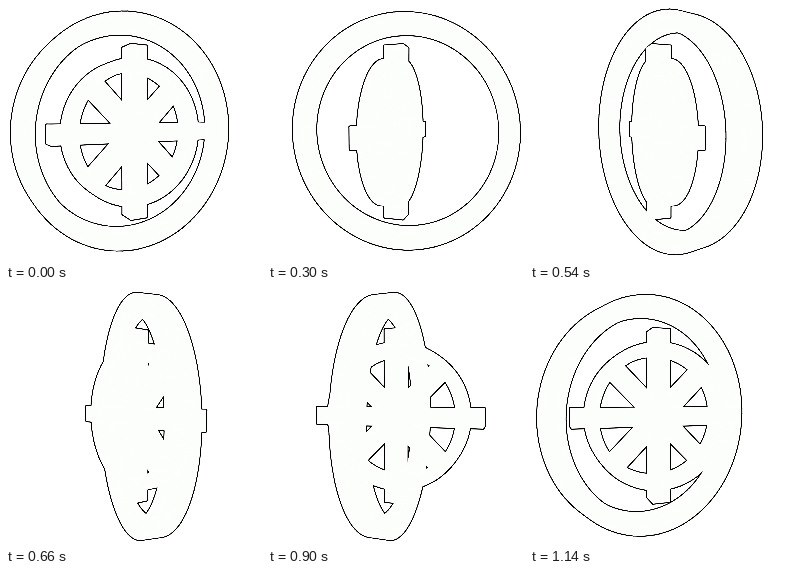
An HTML page with a canvas for the animation above (1200 ms loop, 256 px wide and 256 px high).

```html
<!DOCTYPE html>
<html lang="en">
<head>
<meta charset="utf-8">
<title>Turning wheel and ring</title>
<style>
  html, body { margin: 0; width: 100%; height: 100%; overflow: hidden; background: #fff; }
  canvas { display: block; width: 100vw; height: 100vh; image-rendering: pixelated; }
</style>
</head>
<body>
<canvas id="stage" width="256" height="256"></canvas>
<script>
const SIZE = 256;
const ctx = document.getElementById('stage').getContext('2d', { willReadFrequently: true });
const STEP = 60, STEPS = 20, TURN = Math.PI / STEPS, START = 3 * TURN;
const CX = 128.4, CY = 126.5, DIST = 316, PITCH = 0.055, HALF = 9.5;

function arc(r, from, to, n) {
  return Array.from({ length: n + 1 }, (_, i) => {
    const a = from + (to - from) * i / n;
    return [r * Math.cos(a), r * Math.sin(a)];
  });
}

const rotate = (pts, a) => pts.map(([x, y]) => [
  x * Math.cos(a) - y * Math.sin(a),
  x * Math.sin(a) + y * Math.cos(a)
]);

// The first contour of a solid is its outside, the others are holes.
function makeRing() {
  return [114.4, 98.3].map(r => arc(r, 0, 2 * Math.PI, 120));
}

function makeWheel() {
  const rim = 71.6, inner = 60.5, tab = 84.4, w = 8.5;
  const edge = Math.asin(w / rim), gap = Math.asin(w / inner);
  const quarter = [[tab, -w], [tab, w], ...arc(rim, edge, Math.PI / 2 - edge, 24)];
  const hole = [[w * (1 + Math.SQRT2), w], ...arc(inner, gap, Math.PI / 4 - gap, 6)];
  const outside = [], holes = [];
  for (let i = 0; i < 4; i++) outside.push(...rotate(quarter, i * Math.PI / 2));
  for (let i = 0; i < 8; i++) holes.push(rotate(hole, i * Math.PI / 4));
  return [outside, ...holes];
}

const ring = makeRing(), wheel = makeWheel();

function project([x, y], depth, angle) {
  const c = Math.cos(angle), s = Math.sin(angle);
  const px = x * c + depth * s, z = depth * c - x * s;
  const py = y * Math.cos(PITCH) + z * Math.sin(PITCH);
  const pz = z * Math.cos(PITCH) - y * Math.sin(PITCH);
  const k = DIST / (DIST - pz);
  return [CX + px * k, CY + py * k];
}

function trace(path, pts) {
  pts.forEach(([x, y], i) => i ? path.lineTo(x, y) : path.moveTo(x, y));
  path.closePath();
}

// Projected front, back and side walls.
function faces(solid, angle) {
  const front = new Path2D(), back = new Path2D(), list = [front, back];
  for (const contour of solid) {
    const f = contour.map(p => project(p, HALF, angle));
    const b = contour.map(p => project(p, -HALF, angle));
    trace(front, f);
    trace(back, b);
    f.forEach((p, i) => {
      const j = (i + 1) % f.length, wall = new Path2D();
      trace(wall, [p, f[j], b[j], b[i]]);
      list.push(wall);
    });
  }
  return list;
}

function paint(list, colour, width) {
  ctx.fillStyle = ctx.strokeStyle = colour;
  ctx.lineWidth = width;
  for (const face of list) {
    ctx.fill(face, 'evenodd');
    ctx.stroke(face);
  }
}

// Hardens the smooth outline into crisp pixels.
function sharpen() {
  const image = ctx.getImageData(0, 0, SIZE, SIZE), d = image.data;
  for (let i = 0; i < d.length; i += 4) {
    if (d[i] > 250) continue;
    const v = Math.min(252, Math.max(0, (d[i] - 128) * 2.5 + 128));
    d[i] = d[i + 1] = d[i + 2] = v;
  }
  ctx.putImageData(image, 0, 0);
}

function draw(step) {
  ctx.fillStyle = '#fff';
  ctx.fillRect(0, 0, SIZE, SIZE);
  ctx.lineJoin = 'round';
  const list = [
    ...faces(ring, START - step * TURN),
    ...faces(wheel, START + step * TURN)
  ];
  paint(list, '#000', 2.4);
  paint(list, '#fcfefc', 0.4);
  sharpen();
}

const begin = performance.now();
let shown = -1;

function tick() {
  const step = Math.floor((performance.now() - begin) / STEP) % STEPS;
  if (step !== shown) draw(shown = step);
  requestAnimationFrame(tick);
}
tick();
</script>
</body>
</html>
```
